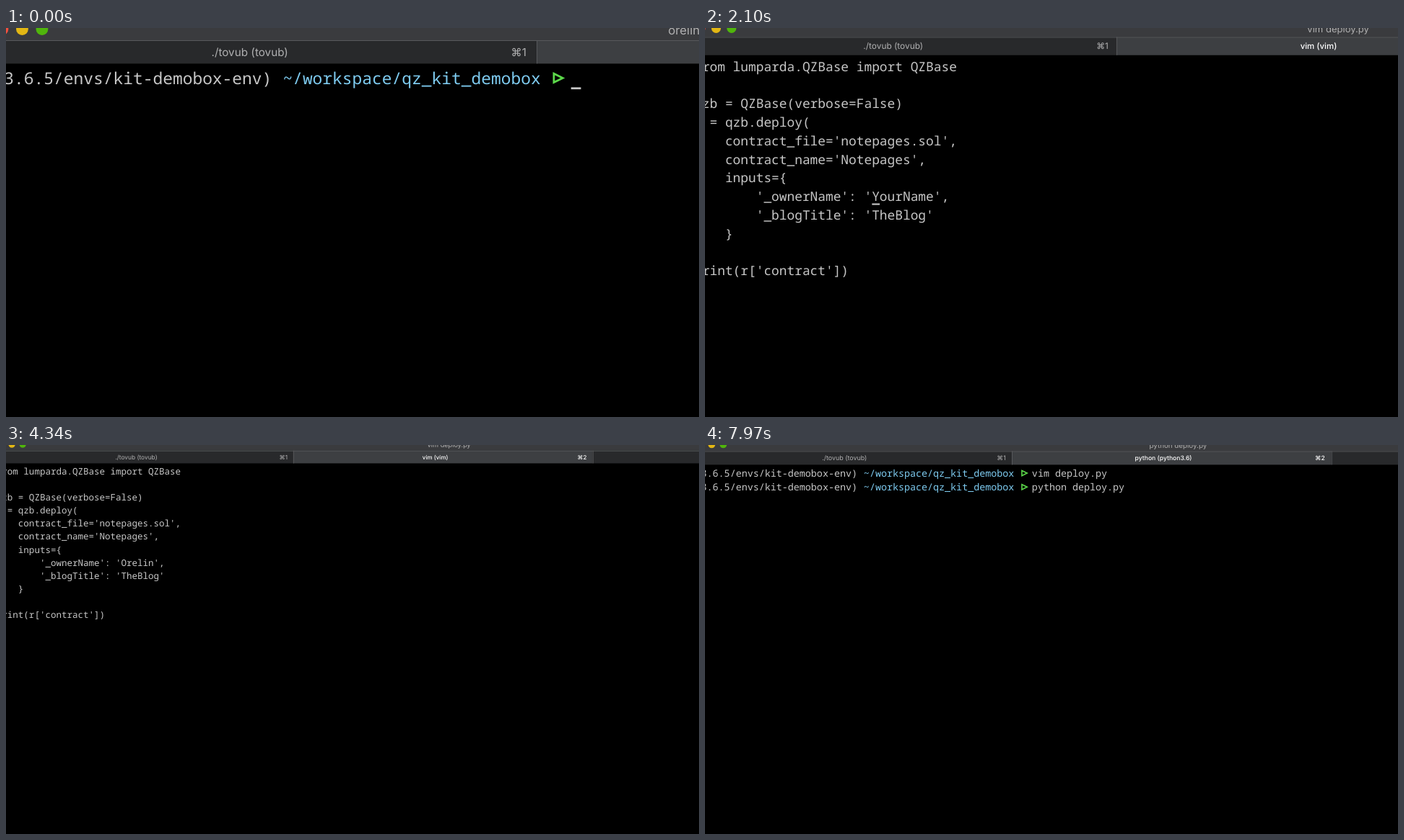
These frames come from a looping animation (960 px wide and 540 px high, 8000 ms). An HTML page with a canvas:

```html
<!DOCTYPE html>
<html lang="en">
<head>
<meta charset="utf-8">
<title>Terminal zoom</title>
<style>
  html, body { margin: 0; width: 100%; height: 100%; overflow: hidden; background: #000; }
  canvas { display: block; width: 960px; height: 540px; }
</style>
</head>
<body>
<canvas id="stage" width="960" height="540"></canvas>
<script>
const ctx = document.getElementById('stage').getContext('2d');
const LOOP = 8000;
const MONO = '"Noto Sans Mono", monospace';
const SANS = 'Inter, "DejaVu Sans", sans-serif';
const COLOR = {
  text: '#c7c7c7', path: '#7ecbf0', arrow: '#5cd84a', cursor: '#c7c7c7',
  title: '#3a3b3e', idle: '#28292b', active: '#3d3f42', line: '#58595c',
  dim: '#b0b0b1', white: '#ffffff'
};

// All layout is in character widths; the zoom is the width of one in pixels.
const ZOOM = [
  [0, 13.756], [300, 13.7], [600, 13.5], [830, 13.2], [1070, 12.795], [1690, 11.63],
  [2100, 10.706], [2520, 9.95], [3340, 8.67], [3600, 8.34], [4170, 7.69],
  [5110, 6.843], [5810, 6.38], [6470, 6.03], [6560, 6.02], [6900, 6.7],
  [7220, 7.65], [7450, 8], [7600, 8.026], [8000, 8.026]
];
const TEXT_LEFT = -0.53, BASELINE = 5.92, ROW = 2.405;
const TAB_TOP = 1.49, TAB_BOTTOM = 3.85, TAB_EDGES = [-5, 54.1, 109.25, 164.4];

const ENV = '(3.6.5/envs/kit-demobox-env)';
const DIR = '~/workspace/qz_kit_demobox';
const EDIT = 'vim deploy.py', RUN = 'python deploy.py';
const DIR_COL = 29.07, INPUT_COL = 58.1;
const OPEN = 620, CLOSE = 4600, START = 6200;
const CUT = 2350, TYPE = 2500, KEY = 110, NAME = 'Orelin';
const MOVES = [
  [OPEN, 0, 0], [1250, 3, 0], [1500, 7, 0], [1700, 7, 9],
  [1850, 7, 19], [2000, 7, 23], [3300, 7, 28], [3450, 8, 28]
];

let u = 1;
const sx = x => x * u - 9.2;
const sy = y => y * u - 3.5;

function zoomAt(t) {
  const slope = i => {
    const a = ZOOM[Math.max(0, i - 1)], b = ZOOM[Math.min(ZOOM.length - 1, i + 1)];
    return (b[1] - a[1]) / (b[0] - a[0]);
  };
  let i = 0;
  while (i < ZOOM.length - 2 && t >= ZOOM[i + 1][0]) i++;
  const [t0, v0] = ZOOM[i], [t1, v1] = ZOOM[i + 1];
  const d = t1 - t0, p = (t - t0) / d, q = 1 - p;
  return q * q * (1 + 2 * p) * v0 + p * p * (3 - 2 * p) * v1
    + d * p * q * (q * slope(i) - p * slope(i + 1));
}

function rect(x0, y0, x1, y1, color) {
  ctx.fillStyle = color;
  ctx.fillRect(sx(x0), sy(y0), (x1 - x0) * u, (y1 - y0) * u);
}

function mono(text, col, row, color = COLOR.text) {
  ctx.font = `${u / 0.6}px ${MONO}`;
  ctx.textAlign = 'left';
  ctx.textBaseline = 'alphabetic';
  ctx.fillStyle = color;
  ctx.fillText(text, sx(col + TEXT_LEFT), sy(BASELINE + row * ROW));
}

function label(text, x, y, size, color, { weight = 400, align = 'center' } = {}) {
  ctx.font = `${weight} ${size * u}px ${SANS}`;
  ctx.textAlign = align;
  ctx.textBaseline = 'alphabetic';
  ctx.fillStyle = color;
  ctx.fillText(text, sx(x), sy(y + size * 0.36));
}

function cursor(col, row) {
  const x = col + TEXT_LEFT, y = 6.24 + row * ROW;
  rect(x, y, x + 1, y + 0.2, COLOR.cursor);
}

function prompt(row, input) {
  mono(ENV, 0, row);
  mono(DIR, DIR_COL, row, COLOR.path);
  const y = 5.3 + row * ROW;
  ctx.beginPath();
  ctx.moveTo(sx(55.84), sy(y - 0.45));
  ctx.lineTo(sx(56.74), sy(y));
  ctx.lineTo(sx(55.84), sy(y + 0.45));
  ctx.closePath();
  ctx.lineWidth = 0.2 * u;
  ctx.strokeStyle = COLOR.arrow;
  ctx.stroke();
  mono(input, INPUT_COL, row);
}

function typed(text, t, start, step) {
  return text.slice(0, Math.max(0, Math.floor((t - start) / step) + 1));
}

function shell(t) {
  if (t < OPEN) {
    const input = typed(EDIT, t, 60, 38);
    prompt(0, input);
    cursor(INPUT_COL + input.length, 0);
    return;
  }
  const input = typed(RUN, t, 4950, 70);
  prompt(0, EDIT);
  prompt(1, input);
  if (t < START) cursor(INPUT_COL + input.length, 1);
}

function editor(t) {
  const owner = t < CUT ? 'YourName' : typed(NAME, t, TYPE, KEY);
  const lines = [
    'from lumparda.QZBase import QZBase', '',
    'qzb = QZBase(verbose=False)',
    'r = qzb.deploy(',
    "    contract_file='notepages.sol',",
    "    contract_name='Notepages',",
    '    inputs={',
    `        '_ownerName': '${owner}',`,
    "        '_blogTitle': 'TheBlog'",
    '    }',
    ')',
    "print(r['contract'])"
  ];
  lines.forEach((line, row) => mono(line, 0, row));
  if (t >= 4100) return;
  if (t >= CUT && t < 3300) {
    cursor(23 + owner.length, 7);
  } else {
    const [, row, col] = MOVES.filter(m => t >= m[0]).pop();
    cursor(col, row);
  }
}

function chrome(t) {
  const inEditor = t >= OPEN && t < CLOSE, running = t >= START;
  const zsh = '..z_kit_demobox (zsh)';
  const current = inEditor ? 'vim (vim)' : running ? 'python (python3.6)' : zsh;

  rect(-5, -5, 170, TAB_TOP, COLOR.title);
  for (let i = 0; i < 3; i++) {
    rect(TAB_EDGES[i], TAB_TOP, TAB_EDGES[i + 1], TAB_BOTTOM, i === 1 ? COLOR.active : COLOR.idle);
  }
  ctx.fillStyle = COLOR.line;
  ctx.fillRect(0, sy(TAB_TOP), 960, 1);
  for (const x of TAB_EDGES) ctx.fillRect(sx(x), sy(TAB_TOP), 1, (TAB_BOTTOM - TAB_TOP) * u);

  ['#f2503f', '#e3b714', '#50b50c'].forEach((color, i) => {
    ctx.beginPath();
    ctx.arc(sx(0.3 + 2 * i), sy(0.37), 0.61 * u, 0, 7);
    ctx.fillStyle = color;
    ctx.fill();
  });

  if (inEditor || running) {
    label(inEditor ? EDIT : RUN, 82.8, 0.45, 1.22, COLOR.dim);
  } else {
    label('orelin@TKMBP1.LAN: ' + DIR, 67.35, 0.45, 1.22, COLOR.dim, { align: 'left' });
  }
  const bold = { weight: 500 };
  label('./tovub (tovub)', 25.22, 2.68, 1.11, COLOR.dim);
  label('⌘1', 52.3, 2.68, 1.1, COLOR.dim);
  label(current, 80.27, 2.68, 1.07, COLOR.white, bold);
  label('⌘2', 107.3, 2.68, 1.07, COLOR.white, bold);
  label(zsh, 135.3, 2.68, 1.07, COLOR.dim);
}

function draw(now) {
  const t = now % LOOP;
  u = zoomAt(t);
  ctx.textRendering = 'geometricPrecision';
  ctx.fillStyle = '#000';
  ctx.fillRect(0, 0, 960, 540);
  if (t >= OPEN && t < CLOSE) editor(t);
  else shell(t);
  chrome(t);
}

const begin = performance.now();
function tick() {
  draw(performance.now() - begin);
  requestAnimationFrame(tick);
}
tick();
</script>
</body>
</html>
```
